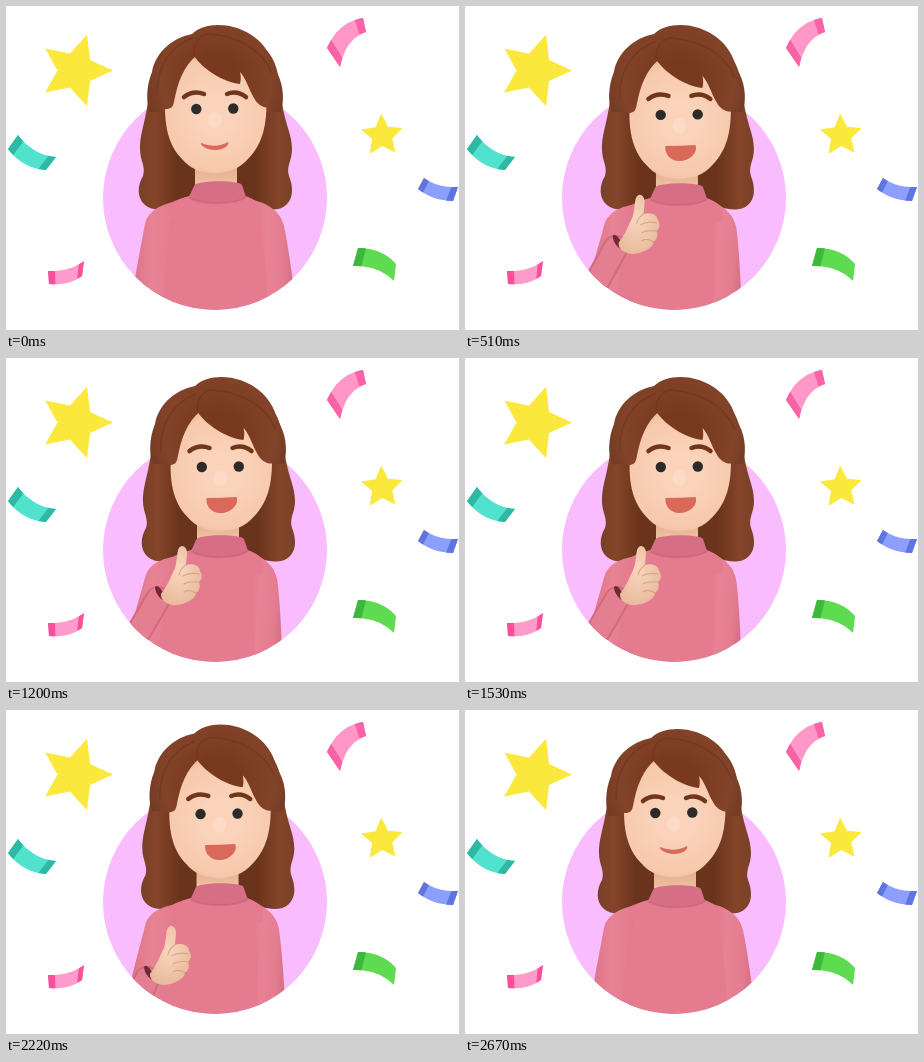
Animation, 453 px wide and 324 px high, one loop 2700 ms. Source, as an HTML page:

```html
<!DOCTYPE html>
<html lang="en">
<head>
<meta charset="utf-8">
<title>Thumbs up</title>
<style>
  html, body { margin: 0; width: 100%; height: 100%; overflow: hidden; background: #fff; }
  svg { display: block; width: 453px; height: 324px; }
  .line { fill: none; stroke-linecap: round; stroke-linejoin: round; }
</style>
</head>
<body>
<svg viewBox="0 0 453 324">
  <defs>
    <clipPath id="disc"><circle cx="209" cy="192" r="112"/></clipPath>
    <radialGradient id="skin" gradientUnits="userSpaceOnUse" cx="211" cy="108" r="66">
      <stop offset=".3" stop-color="#fad3ba"/><stop offset=".85" stop-color="#f7c8ac"/><stop offset="1" stop-color="#edb797"/>
    </radialGradient>
    <linearGradient id="neckSkin" x2="0" y2="1">
      <stop stop-color="#dca482"/><stop offset="1" stop-color="#f3c8aa"/>
    </linearGradient>
    <radialGradient id="hair" gradientUnits="userSpaceOnUse" cx="210" cy="72" r="74">
      <stop offset=".3" stop-color="#78391f"/><stop offset=".75" stop-color="#824329"/><stop offset="1" stop-color="#733a24"/>
    </radialGradient>
    <linearGradient id="lock" gradientUnits="userSpaceOnUse" x1="133" x2="287">
      <stop stop-color="#784028"/><stop offset=".1" stop-color="#854529"/><stop offset=".25" stop-color="#69331c"/>
      <stop offset=".75" stop-color="#69331c"/><stop offset=".9" stop-color="#854529"/><stop offset="1" stop-color="#784028"/>
    </linearGradient>
    <linearGradient id="sleeve">
      <stop stop-color="#dc7387"/><stop offset=".4" stop-color="#e88396"/><stop offset=".75" stop-color="#e47c90"/><stop offset="1" stop-color="#cf6a7d"/>
    </linearGradient>
    <radialGradient id="fist" cx=".45" cy=".4" r=".65">
      <stop stop-color="#f8d6be"/><stop offset="1" stop-color="#e9b99a"/>
    </radialGradient>
  </defs>

  <g id="confetti"></g>
  <circle cx="209" cy="192" r="112" fill="#f8bcff"/>

  <g id="back">
    <path fill="url(#lock)" d="M144 80C140 118 134 125 134 143C134 155 140 160 137 170C131 180 131 192 139 199C148 207 168 203 180 196H240C252 203 272 207 280 199C288 192 287 180 283 170C280 160 286 155 286 143C286 125 277 118 274 80Z"/>
    <path fill="url(#hair)" d="M212 19C240 19 264 38 268 62C277 74 279 92 275 106H144C140 98 140 80 146 66C149 48 165 32 186 28C192 22 202 19 212 19Z"/>
  </g>

  <g clip-path="url(#disc)">
    <g id="body">
      <path fill="url(#neckSkin)" d="M189 150H231V186H189Z"/>
      <path fill="#e47b8f" d="M186 189C170 194 156 199 150 208L142 330H262L266 210C258 199 250 195 238 189Z"/>
      <path id="armR" fill="url(#sleeve)" d="M242 193C262 196 275 206 278 220C282 240 285 260 288 285L290 330H264C262 290 260 260 257 235C256 220 246 208 242 193Z"/>
      <path id="armL" fill="url(#sleeve)" d="M178 194C155 197 142 205 139 218C135 240 131 258 127 285L126 330H157C157 290 159 260 162 235C164 218 176 207 178 194Z"/>
      <path fill="#e47b8f" d="M180 191C165 196 161 202 166 214H254C259 202 254 196 242 191Z"/>
      <path fill="#d66f85" d="M188 180C190 174 233 174 236 179L240 191C230 199 195 199 183 191Z"/>
      <path class="line" stroke="#c25e73" stroke-opacity=".5" stroke-width="2" d="M184 192C197 199 229 199 240 191"/>
    </g>
    <path class="line forearm" stroke="#d06a7d" stroke-width="26"/>
    <path class="line forearm" stroke="#e47e91" stroke-width="22"/>
    <g id="hand">
      <ellipse cx="154" cy="235" rx="3" ry="8" transform="rotate(-32 154 235)" fill="#6e2b35"/>
      <path fill="url(#fist)" d="M155 236C162 227 165 218 169 210C171 203 171 196 172 192C174 186 180 187 181 194C181 199 180 204 180 207C187 205 194 208 194 213C197 217 196 222 193 224C195 229 193 233 190 235C189 242 179 246 171 247C163 248 154 243 155 236Z"/>
      <path class="line" stroke="#c98f70" stroke-opacity=".6" stroke-width="1.2" d="M180 207Q174 211 173 217M193 216Q183 214 177 218M193 224Q183 223 178 226M190 235Q183 231 178 234"/>
    </g>
  </g>

  <g id="face">
    <path fill="url(#skin)" d="M160 85C157 115 161 138 176 153C191 172 226 172 242 153C258 137 262 115 260 85C258 20 162 20 160 85Z"/>
    <ellipse cx="209" cy="114" rx="7" ry="8" fill="#fde2cf" opacity=".5"/>
    <g id="brows" class="line" stroke="#70351a" stroke-width="4.500">
      <path d="M178 91Q187 84 198 88"/><path d="M221 88Q231 84 240 91"/>
    </g>
    <g fill="#2d2a28"><circle cx="190.300" cy="103" r="5.200"/><circle cx="227.300" cy="102.500" r="5.200"/></g>
    <path id="mouth" fill="#da695b"/>
  </g>

  <g id="fringe">
    <path fill="url(#hair)" d="M190 50C178 60 172 75 168 96C167 101 165 103 160 103C152 104 147 97 145 88C146 66 152 42 178 31L202 28Z"/>
    <path fill="url(#hair)" d="M188 50C196 62 216 76 234 78C235 74 235 70 234 66C240 72 243 84 248 92C252 100 260 104 269 100C276 86 274 60 262 46C248 30 220 24 196 28C188 34 186 44 188 50Z"/>
    <g class="line" stroke="#5b2813" stroke-opacity=".3" stroke-width="1.500">
      <path d="M188 49C187 38 192 31 201 28C231 29 257 44 266 67"/>
      <path d="M186 32C162 42 151 62 151 89"/>
    </g>
  </g>
</svg>

<script>
const LOOP = 2700;
const $ = id => document.getElementById(id);
const lerp = (a, b, t) => a + (b - a) * t;

// Confetti
const polygon = (color, points) =>
  $('confetti').insertAdjacentHTML('beforeend', `<polygon fill="${color}" points="${points.join(' ')}"/>`);

function star(cx, cy, radius, turn) {
  polygon('#fbe83d', Array.from({ length: 10 }, (_, i) => {
    const r = i % 2 ? radius * .48 : radius;
    const a = (turn + i * 36) * Math.PI / 180;
    return [cx + r * Math.cos(a), cy + r * Math.sin(a)];
  }));
}

// A strip between a curve start-bend-end and the same curve shifted by a depth at each end
function ribbon(color, dark, start, bend, end, depthA, depthB, tail = .83) {
  const edge = (t, side) => [0, 1].map(k =>
    lerp(lerp(start[k], bend[k], t), lerp(bend[k], end[k], t), t) + side * lerp(depthA[k], depthB[k], t));
  const piece = (fill, from, to) => {
    const steps = Array.from({ length: 13 }, (_, i) => lerp(from, to, i / 12));
    polygon(fill, [...steps.map(t => edge(t, 0)), ...steps.reverse().map(t => edge(t, 1))]);
  };
  piece(color, 0, 1);
  piece(dark, 0, .17);
  piece(dark, tail, 1);
}

star(69.5, 64.5, 37.5, 0);
star(376, 129.5, 22, -20);
ribbon('#ff98c8', '#f962a4', [321, 42], [332, 16], [357, 12], [13, 19], [3, 14]);
ribbon('#50e2cd', '#2fb8a5', [12, 129], [27, 149], [50, 151], [-10, 14], [-10, 13]);
ribbon('#8d9ffc', '#6074e0', [418, 172], [432, 182], [452, 181], [-6, 11], [-5, 14]);
ribbon('#5edb50', '#3cb83a', [352, 242], [376, 242], [390, 258], [-5, 18], [-2, 17], 1);
ribbon('#ff9bcb', '#f8519a', [42, 265], [63, 266], [78, 255], [1, 13], [-2, 15]);

// Motion: a raised-thumb pose, a hop on the way back, and small nods
const span = (t, from, to) => Math.min(1, Math.max(0, (t - from) / (to - from)));
const ramp = (t, from, to) => { const u = span(t, from, to); return u * u * (3 - 2 * u); };
const bump = (t, from, to) => Math.sin(Math.PI * span(t, from, to));

function place(id, x, y, angle = 0, pivot = '0 0') {
  $(id).setAttribute('transform', `translate(${x} ${y}) rotate(${angle} ${pivot})`);
}

function mouthPath(open) {
  const m = (closed, wide) => lerp(closed, wide, open);
  const top = m(137, 134);
  return `M195 ${top}Q209 ${m(143, 134)} ${m(222, 225)} ${top - 1}
    C${m(224, 228)} ${m(139, 141)} ${m(218, 219)} ${m(144, 149)} 209 ${m(144, 149)}
    S194 ${m(139, 141)} 195 ${top}Z`;
}

function draw(t) {
  const cheer = ramp(t, 200, 540) - ramp(t, 2100, 2490);
  const hop = bump(t, 2100, 2640);
  const nod = bump(t, 540, 690) + bump(t, 1200, 1530);
  const grin = ramp(t, 380, 510) - ramp(t, 2240, 2420);
  const lowered = 1 - ramp(t, 330, 540) + ramp(t, 2100, 2370);

  place('back', 3 * cheer, -7 * hop);
  place('face', 5.5 * cheer, 6 * cheer - 5.5 * hop + .8 * nod);
  place('brows', 0, -4 * cheer);
  place('fringe', 3.5 * cheer, 4 * cheer - 6 * hop + .6 * nod);
  place('body', 2 * cheer, 2 * cheer - 5.5 * hop);
  place('armR', -7 * cheer, 0, 5 * cheer, '262 203');
  place('armL', 0, 0, 5 * cheer, '160 200');
  $('mouth').setAttribute('d', mouthPath(grin));

  const x = -26 * lowered, y = 120 * lowered ** 1.7;
  place('hand', x, y);
  for (const el of document.querySelectorAll('.forearm'))
    el.setAttribute('d', `M131 ${277 + .6 * y}L${152 + x} ${241 + y}`);
}

function tick() {
  draw(performance.now() % LOOP);
  requestAnimationFrame(tick);
}
tick();
</script>
</body>
</html>
```
